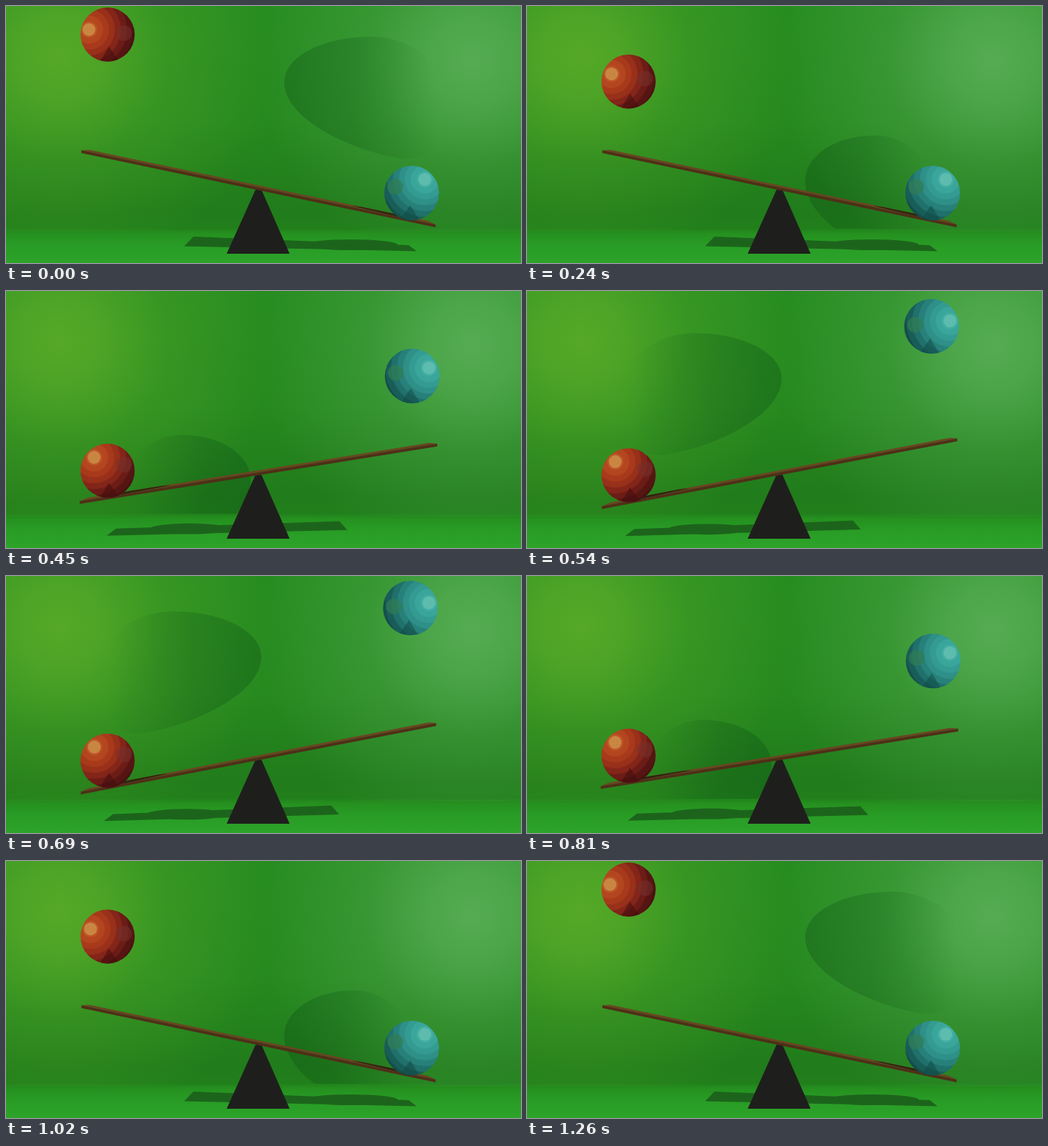
An HTML page with a canvas for the animation above (1.29 s loop, 720 by 360 pixels).

```html
<!DOCTYPE html>
<html lang="en">
<head>
<meta charset="utf-8">
<title>Seesaw</title>
<style>
  html, body { margin: 0; overflow: hidden; background: #268a21; }
  canvas { display: block; }
</style>
</head>
<body>
<canvas id="stage" width="720" height="360"></canvas>
<script>
const ctx = document.getElementById('stage').getContext('2d');
const STEP = 30, STEPS = 43, IMPACT = 10, REST = 20;
const PIVOT = { x: 353, y: 256 }, HALF = 253, FLOOR = 312;

const TILT = [[10, 11.84], [12, -2.83], [15, -9.13], [18, -10.8], [20, -11]];
const LAUNCH = [[10, 262], [12, 205], [15, 119], [18, 49.5], [20, 43]];

const RED = {
  bands: ['#bd5426', '#b3461f', '#a83a1b', '#98301a', '#832518', '#6c1c16', '#561513', '#481211'],
  glint: '#c98642', spot: 'rgba(118,48,44,.55)', side: -1
};
const BLUE = {
  bands: ['#42aea2', '#3aa69b', '#349b92', '#2e9088', '#27817a', '#20706b', '#195d59', '#144e4a'],
  glint: '#5dbcae', spot: 'rgba(48,124,84,.7)', side: 1
};

// Monotone cubic through a few [time, value] points.
function curve(points, t) {
  const last = points.length - 1;
  if (t <= points[0][0]) return points[0][1];
  if (t >= points[last][0]) return points[last][1];
  const slope = i => (points[i + 1][1] - points[i][1]) / (points[i + 1][0] - points[i][0]);
  const tangent = i => {
    if (i === 0) return slope(0);
    if (i === last) return 0;
    const a = slope(i - 1), b = slope(i);
    return 2 * a * b / (a + b);
  };
  let i = 0;
  while (t > points[i + 1][0]) i++;
  const [t0, v0] = points[i], [t1, v1] = points[i + 1];
  const h = t1 - t0, s = (t - t0) / h;
  return v0 + (v1 - v0) * s * s * (3 - 2 * s)
    + h * s * (1 - s) * (tangent(i) * (1 - s) - tangent(i + 1) * s);
}

function gradient(g, stops) {
  stops.forEach(([at, color]) => g.addColorStop(at, color));
  return g;
}

function polygon(points, color) {
  ctx.beginPath();
  points.forEach(p => ctx.lineTo(...p));
  ctx.closePath();
  ctx.fillStyle = color;
  ctx.fill();
}

function disc(x, y, r, color) {
  ctx.beginPath();
  ctx.arc(x, y, r, 0, 2 * Math.PI);
  ctx.fillStyle = color;
  ctx.fill();
}

function glow(x, y, r, rgb, alpha) {
  ctx.fillStyle = gradient(ctx.createRadialGradient(x, y, 0, x, y, r), [
    [0, `rgba(${rgb},${alpha})`], [.2, `rgba(${rgb},${alpha * .82})`],
    [.5, `rgba(${rgb},${alpha * .36})`], [1, `rgba(${rgb},0)`]
  ]);
  ctx.fillRect(0, 0, 720, FLOOR + 4);
}

function drawRoom() {
  ctx.fillStyle = gradient(ctx.createLinearGradient(0, 0, 0, 360), [
    [0, '#268c20'], [.45, '#26891f'], [.8, '#217c1b'], [.865, '#217f1b'],
    [.885, '#25901f'], [.93, '#289c25'], [1, '#2da32a']
  ]);
  ctx.fillRect(0, 0, 720, 360);
  glow(75, 70, 300, '112,186,44', .64);
  glow(652, 75, 300, '112,190,112', .64);
}

// Shadow thrown on the wall by a ball in the air, fading away from its tip.
function drawWallShadow(tipX, tipY, dir, scale) {
  ctx.save();
  ctx.beginPath();
  ctx.rect(0, 0, 720, FLOOR);
  ctx.clip();
  ctx.translate(tipX, tipY);
  ctx.scale(dir * scale, 1);
  ctx.beginPath();
  ctx.moveTo(0, 0);
  ctx.bezierCurveTo(0, -35, 50, -63, 120, -64);
  ctx.bezierCurveTo(250, -64, 270, 110, 165, 107);
  ctx.bezierCurveTo(90, 95, 0, 50, 0, 0);
  ctx.fillStyle = gradient(ctx.createLinearGradient(0, 0, 210, 0), [
    [0, 'rgba(8,70,20,.3)'], [.45, 'rgba(8,70,20,.22)'], [1, 'rgba(8,70,20,0)']
  ]);
  ctx.fill();
  ctx.restore();
}

function drawFloorShadow(tilt, redDown, blueDown) {
  const f = tilt / 11.84;
  const left = 174 + 57 * f + 18 * f * f, right = 527 + 57 * f - 10 * f * f;
  ctx.beginPath();
  ctx.moveTo(left, 340 - 3.5 * f);
  ctx.lineTo(left + 13, 328.5 - 5.5 * f);
  ctx.lineTo(right - 11, 328 + 7 * f);
  ctx.lineTo(right, 338.5 + 5 * f);
  ctx.closePath();
  const blob = (x, y, rx) => {
    ctx.moveTo(x + rx, y);
    ctx.ellipse(x, y, rx, 7.5, 0, 0, 2 * Math.PI);
  };
  if (redDown) blob(280 + 30 * f, 330 - 4 * f, 56);
  if (blueDown) blob(432 + 50 * f, 330 + 4.5 * f, 66);
  ctx.fillStyle = '#1c641b';
  ctx.fill();
}

function drawBoard(tilt, redDown, blueDown) {
  const a = tilt * Math.PI / 180, cos = Math.cos(a), sin = Math.sin(a);
  const at = (u, v) => [PIVOT.x + u * cos, PIVOT.y + u * sin + v];
  const back = ([x, y]) => [353 + (x - 353) * .955, 190 + (y - 190) * .955];
  const l = at(-HALF, -2), r = at(HALF, -2);
  polygon([l, back(l), back(r), r], '#694621');
  const contact = (side, inner) => polygon([
    at(side * inner, -3.5), at(side * (inner + 14), -4.8),
    at(side * 205, -4.8), at(side * 205, -1.5)
  ], '#2f230f');
  if (redDown) contact(-1, 100 - 2.5 * tilt);
  if (blueDown) contact(1, 100 + 2.8 * tilt);
  polygon([l, r, at(HALF, 2), at(-HALF, 2)], '#4f2f18');
}

function drawBall({ bands, glint, spot, side }, x, y, r) {
  const drop = y - 40;
  const gx = x + side * (26 - .034 * drop), gy = y - 7 - .055 * drop;
  const n = bands.length, stops = [];
  bands.forEach((color, i) => stops.push([i / n, color], [(i + .8) / n, color]));
  const shade = gradient(ctx.createRadialGradient(gx, gy, 4, gx, gy, 70), stops);
  ctx.save();
  disc(x, y, r, shade);
  ctx.clip();
  disc(x - side * 23, y - 2 - .03 * drop, 11, spot);
  polygon([[x - side * 2, y + 17], [x - side * 18, y + 40], [x + side * 12, y + 40]],
    side < 0 ? 'rgba(66,14,14,.55)' : 'rgba(16,72,68,.5)');
  disc(gx, gy, 9, glint);
  ctx.restore();
}

function draw(now) {
  const step = Math.floor(now / STEP) % STEPS;
  const k = Math.min(step, STEPS - 1 - step, REST);
  const tilt = curve(TILT, k), rise = Math.tan(tilt * Math.PI / 180);
  const redDown = k >= IMPACT, blueDown = k <= 12;
  const redY = redDown ? 217.8 - 211 * rise : 40 + 133.5 * (k / IMPACT) ** 3.17;
  const blueY = curve(LAUNCH, k);
  const blueX = 568.5 - 2.2 * ((blueY - 175) / 110) ** 2;

  drawRoom();
  drawWallShadow(389, 107 + 2.1 * (redY - 40), 1, 1 - .003 * (redY - 40));
  drawWallShadow(356 - .2 * (blueY - 49), 122 + 2.05 * (blueY - 49), -1, 1 - .003 * (blueY - 49));
  drawFloorShadow(tilt, redDown, blueDown);
  polygon([[349, 257], [357, 257], [396.5, 347], [308.5, 347]], '#1e1f1c');
  drawBoard(tilt, redDown, blueDown);
  drawBall(RED, 142, redY, 37.9);
  drawBall(BLUE, blueX, blueY, 38.3);
}

function loop() {
  draw(performance.now());
  requestAnimationFrame(loop);
}
loop();
</script>
</body>
</html>
```
